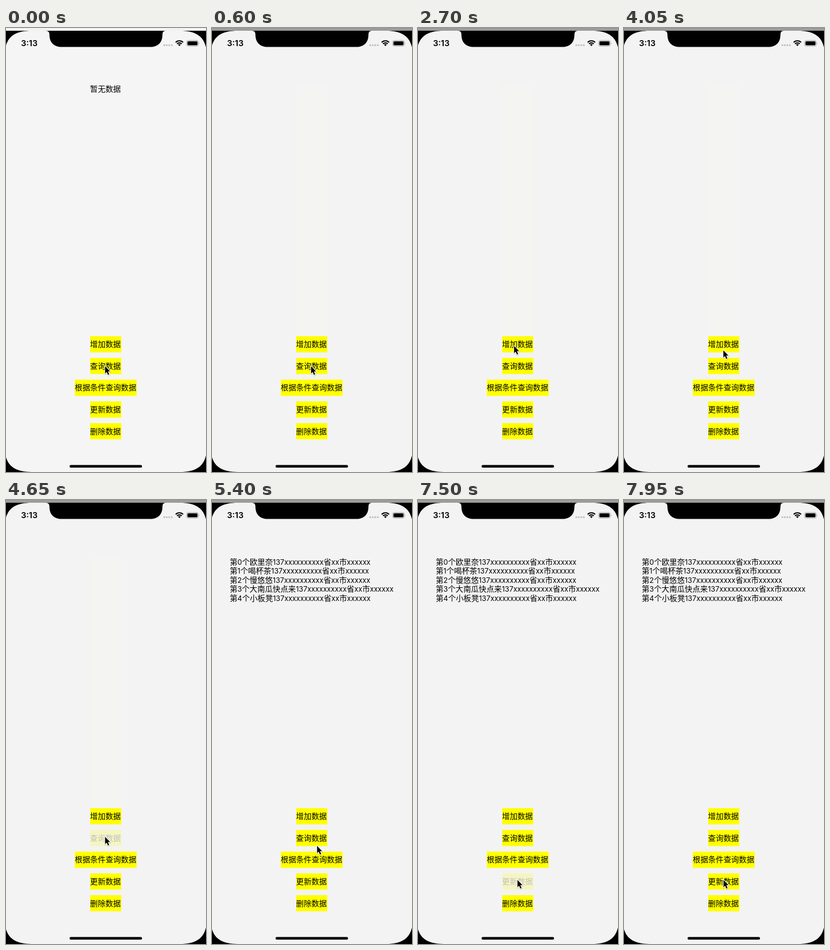
Animation, 366 px wide and 809 px high, one loop 8 s. Source, as an HTML page:

```html
<!DOCTYPE html>
<html lang="zh-CN">
<head>
<meta charset="utf-8">
<title>数据列表</title>
<style>
html, body { margin: 0; width: 100%; height: 100%; overflow: hidden; background: #000; }
svg { display: block; width: 366px; height: 809px; }
text { font: 14.1px "Noto Sans CJK SC", "Noto Sans CJK JP", "Noto Sans CJK", sans-serif; fill: #000; white-space: pre; }
.latin { font-family: Inter, sans-serif; font-size: 13.2px; }
.clock { font: 600 15px Inter, sans-serif; }
</style>
</head>
<body>
<svg viewBox="0 0 366 809" xmlns="http://www.w3.org/2000/svg">
  <rect width="366" height="809"/>
  <rect id="bar" width="366" height="5"/>
  <path id="screen" d="M-3 55 C-3 19.500 11.500 5 47 5 H73 Q79.500 5 79.500 12 C79.500 26.500 88 34.600 102 34.600 H264 C278 34.600 286.300 26.500 286.300 12 Q286.300 5 292.500 5 H318 C353.500 5 368 19.500 368 55 V759 C368 794.500 353.500 809 318 809 H47 C11.500 809 -3 794.500 -3 759 Z"/>

  <text class="clock" x="27.500" y="33.300">3:13</text>
  <g id="signal" fill="#c3c3c3"></g>
  <g fill="none" stroke="#000" stroke-width="2.100">
    <path d="M310.500 26.200 A9.400 9.400 0 0 1 324.100 26.200"/>
    <path d="M313 28.900 A6 6 0 0 1 321.600 28.900"/>
    <path d="M317.300 33 L314.900 30.500 A3.500 3.500 0 0 1 319.700 30.500 Z" fill="#000" stroke="none"/>
  </g>
  <rect x="330.500" y="22.800" width="21.500" height="10.200" rx="3" fill="none" stroke="#a0a0a0"/>
  <rect x="332" y="24.300" width="18.500" height="7.200" rx="1.700"/>
  <path d="M353 26.200 Q354.700 27.900 353 29.600 Z" fill="#a0a0a0"/>

  <rect id="column" x="154" y="105" width="57" height="456" fill="#f4f4f2"/>
  <text id="empty" x="153.800" y="116.300">暂无数据</text>
  <g id="list"></g>
  <g id="buttons"></g>
  <rect x="116.300" y="796.200" width="132.700" height="4.900" rx="2.450"/>

  <g id="cursor">
    <g id="arrow" transform="translate(.3 .2) scale(.9)" stroke-linejoin="round"></g>
  </g>
</svg>
<script>
const LOOP = 8000, STEP = 150;
const $ = id => document.getElementById(id);

function add(parent, tag, attrs, text = '') {
  const el = document.createElementNS('http://www.w3.org/2000/svg', tag);
  for (const key in attrs) el.setAttribute(key, attrs[key]);
  el.textContent = text;
  return parent.appendChild(el);
}

for (let i = 0; i < 4; i++) {
  add($('signal'), 'rect', { x: 288 + i * 4.6, y: 29.8, width: 3.2, height: 3.2, rx: 1 });
}

const arrow = 'M0 0 V14.8 L3.3 11.7 L5.8 17.5 L8.3 16.4 L5.8 10.7 H10.3 Z';
add($('arrow'), 'path', {
  d: arrow, transform: 'translate(.4 1.2)', fill: 'none',
  stroke: '#000', 'stroke-opacity': 0.13, 'stroke-width': 3.4
});
add($('arrow'), 'path', { d: arrow, stroke: '#fff', 'stroke-width': 2.4, 'paint-order': 'stroke' });

['欧里奈', '喝杯茶', '慢悠悠', '大南瓜快点来', '小板凳'].forEach((name, i) => {
  const row = add($('list'), 'text', { x: 32.5, y: 117.7 + i * 16.55 });
  const put = (text, latin) => add(row, 'tspan', latin ? { class: 'latin' } : {}, text);
  put('第');
  put(i, true);
  put('个' + name);
  put('137xxxxxxxxxx', true);
  put('省');
  put('xx', true);
  put('市');
  put('xxxxxx', true);
});

const buttons = ['增加数据', '查询数据', '根据条件查询数据', '更新数据', '删除数据'].map((label, i) => {
  const y = 561.5 + i * 39.6, wide = label.length > 4;
  const x = wide ? 126 : 154;
  const g = add($('buttons'), 'g', {});
  add(g, 'rect', { x, y, width: wide ? 113 : 57, height: 29.6, fill: '#ff0' });
  add(g, 'text', { x: x - 0.2, y: y + 19.7 }, label);
  return g;
});

// Pointer path: time, x, y
const path = [
  [0, 181, 616], [1350, 181, 616], [1950, 175.5, 579],
  [3900, 175.5, 579], [4050, 181.5, 587], [4500, 181, 613.5],
  [5250, 181, 613.5], [5400, 192, 630], [5550, 187, 658], [5850, 160, 737],
  [6300, 178, 689], [6450, 180.5, 684], [6600, 180.5, 681.5], [7050, 181.7, 692],
  [LOOP, 181.7, 692]
];

// Taps: button index, press time, release time
const taps = [[1, 300, 450], [0, 2250, 2550], [1, 4650, 4800], [3, 7500, 7800]];

function pointer(t) {
  const i = path.findIndex(p => p[0] > t);
  const [t0, x0, y0] = path[i - 1], [t1, x1, y1] = path[i];
  const k = (t - t0) / (t1 - t0);
  return [x0 + (x1 - x0) * k, y0 + (y1 - y0) * k];
}

function opacity(index, t) {
  const tap = taps.find(([b, down, up]) => b === index && t >= down && t < up + STEP);
  return !tap ? 1 : t < tap[2] ? 0.2 : 0.6;
}

const show = (id, on) => $(id).setAttribute('visibility', on ? 'visible' : 'hidden');

function draw(time) {
  const t = Math.floor((time % LOOP) / STEP) * STEP;
  const active = t >= 150;
  $('bar').setAttribute('fill', active ? '#9c9c9c' : '#f1f3f2');
  $('screen').setAttribute('fill', active ? '#f3f3f3' : '#f5f5f5');
  show('empty', t < 450);
  show('column', t >= 450 && t < 4800);
  show('list', t >= 4800);
  buttons.forEach((b, i) => b.setAttribute('opacity', opacity(i, t)));
  $('cursor').setAttribute('transform', `translate(${pointer(t)})`);
}

const start = performance.now();
function frame() {
  draw(performance.now() - start);
  requestAnimationFrame(frame);
}
frame();
</script>
</body>
</html>
```
